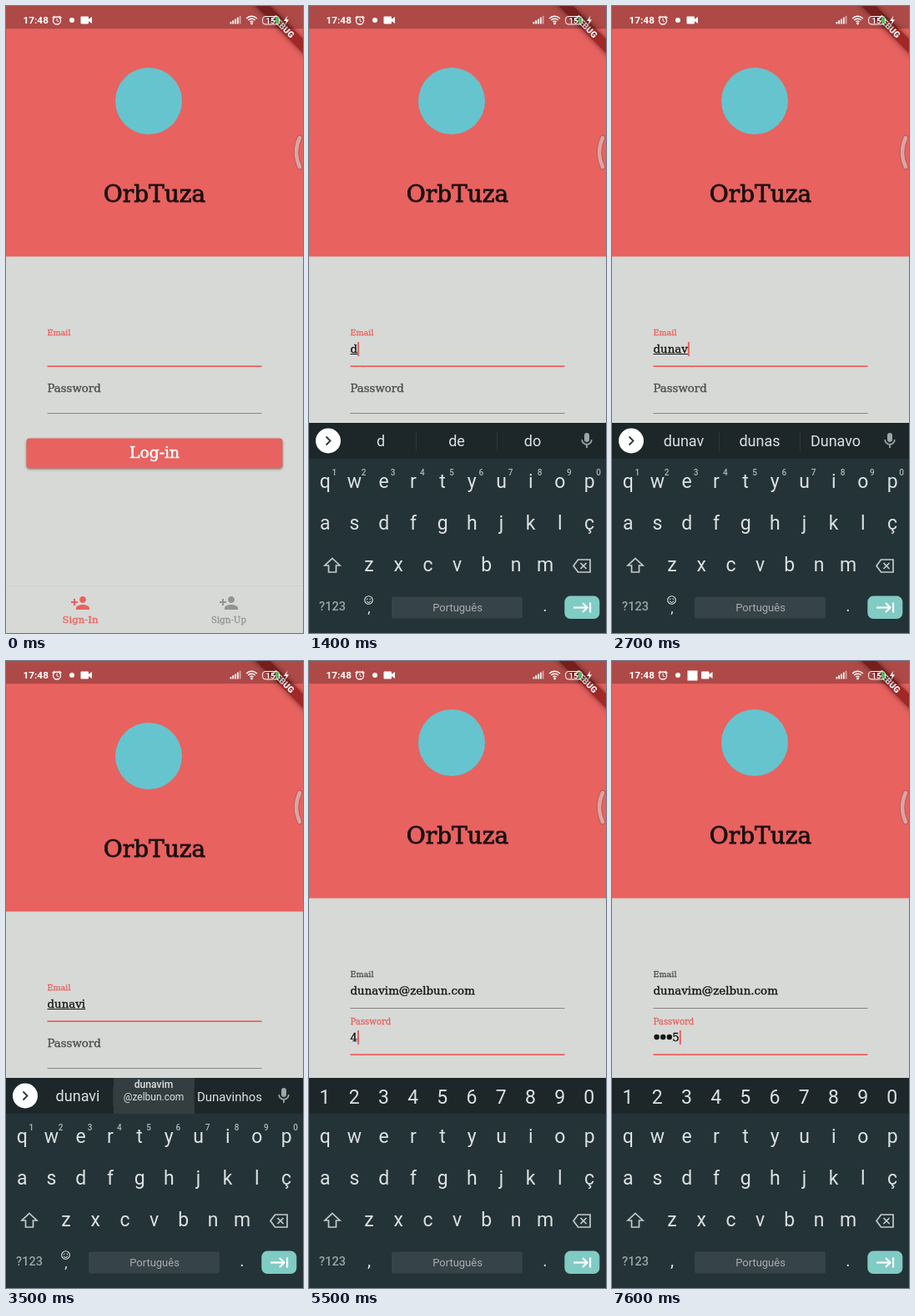
Animation of 356 by 752 pixels, one loop 8 s. Source, as an HTML page with a canvas:

```html
<!DOCTYPE html>
<html lang="en">
<head>
<meta charset="utf-8">
<title>Login form</title>
<style>
html, body { margin: 0; width: 100%; height: 100%; overflow: hidden; background: #d7d9d6; }
canvas { display: block; width: 356px; height: 752px; }
</style>
</head>
<body>
<canvas id="stage"></canvas>
<script>
const W = 356, H = 752, LOOP = 8000;
const RED = '#e8625f', BODY = '#d7d9d6', INK = '#171717', GREY = '#4d4f4e';
const KEY = '#dce1e2', DIM = '#9ca5a7', KEYS = '#243337', BAR = '#1d272a';
const SLAB = '"DejaVu Serif", serif', SANS = 'Roboto, sans-serif';
const EMAIL = 'dunavim@zelbun.com';
const PERSON = new Path2D('M15 12c2.2 0 4-1.8 4-4s-1.8-4-4-4-4 1.8-4 4 1.8 4 4 4zM6 10V7H4v3H1v2h3v3h2v-3h3v-2zM15 14c-2.7 0-8 1.3-8 4v2h16v-2c0-2.7-5.3-4-8-4z');

const canvas = document.getElementById('stage');
const c = canvas.getContext('2d');
const dpr = window.devicePixelRatio || 1;
canvas.width = W * dpr;
canvas.height = H * dpr;

const clamp = v => Math.max(0, Math.min(1, v));
const easeOut = (t, start, span, power = 2) => 1 - (1 - clamp((t - start) / span)) ** power;
const latest = (list, t) => list.filter(e => e[0] <= t).pop();

function rect(x, y, w, h, color, r = 0) {
  c.fillStyle = color;
  c.beginPath();
  c.roundRect(x, y, w, h, r);
  c.fill();
}

function disc(x, y, r, color) {
  c.fillStyle = color;
  c.beginPath();
  c.arc(x, y, r, 0, 7);
  c.fill();
}

function ring(x, y, r, color, w, a = 0, b = Math.PI * 2) {
  c.strokeStyle = color;
  c.lineWidth = w;
  c.beginPath();
  c.arc(x, y, r, a, b);
  c.stroke();
}

function poly(pts, color, w = 0, close = false) {
  c.beginPath();
  for (let i = 0; i < pts.length; i += 2) c.lineTo(pts[i], pts[i + 1]);
  if (close || !w) c.closePath();
  if (w) {
    c.strokeStyle = color;
    c.lineWidth = w;
    c.stroke();
  } else {
    c.fillStyle = color;
    c.fill();
  }
}

function text(s, x, y, size, color, font = SANS, align = 'center', weight = 400) {
  c.font = `${weight} ${size}px ${font}`;
  c.textAlign = align;
  c.fillStyle = color;
  c.fillText(s, x, y);
  return c.measureText(s).width;
}

// Slab lettering is a little heavier than the regular cut.
function slab(s, x, y, size, color, align = 'left') {
  const w = text(s, x, y, size, color, SLAB, align);
  c.strokeStyle = color;
  c.lineWidth = size * 0.03;
  c.lineJoin = 'round';
  c.strokeText(s, x, y);
  c.lineJoin = 'miter';
  return w;
}

// [time, text, still composing]
const typed = [[0, '', 0], [1400, 'd', 1], [1800, 'du', 1], [2100, 'dun', 1], [2400, 'duna', 1],
  [2600, 'dunav', 1], [2800, 'dunavi', 1], [3600, EMAIL, 0]];
const hints = [[1400, ['d', 'de', 'do']], [1900, ['du', 'da', 'duas']], [2200, ['dun', 'mãe', 'Dunel']],
  [2500, ['duna', 'dunas', 'Dunel']], [2700, ['dunav', 'dunas', 'Dunavo']],
  [3000, ['dunavi', '', 'Dunavinhos']], [3700, ['e', 'de', 'a']]];
// [time, hidden characters, visible last character]
const secret = [[0, 0, ''], [5400, 0, '4'], [5900, 1, '2'], [6500, 2, '1'], [7500, 3, '5']];
const restarts = [800, 1400, 1800, 2100, 2400, 2600, 2800, 3600, 4100, 5400, 5900, 6500, 7500];

function cursorOn(t) {
  const last = restarts.filter(r => r <= t).pop();
  return last !== undefined && (t - last) % 1000 < 500;
}

function cursor(x, base, t) {
  if (cursorOn(t)) rect(x, base - 13, 2, 17, RED);
}

function underline(y, active) {
  if (active) rect(49.5, y - 0.8, 257, 1.9, RED);
  else rect(49.5, y, 257, 1, '#858784');
}

function form(t) {
  const onSecret = t >= 4100;
  rect(0, 0, W, 300.6, RED);
  disc(171, 114, 40, '#66c4ce');
  slab('OrbTuza', 178, 235, 28, '#1c1011', 'center');

  slab('Email', 49.5, 395, 9.6, onSecret ? GREY : RED);
  const [, mail, composing] = latest(typed, t);
  const mw = slab(mail, 49.5, 416, 13.4, INK);
  if (composing) rect(49.5, 417, mw, 1, INK);
  if (!onSecret) cursor(49.5 + mw, 416, t);
  underline(432, !onSecret);

  const lift = easeOut(t, 4115, 200, 2.2);
  slab('Password', 49.5, 463 - 11 * lift, 13.3 - 3.2 * lift, onSecret ? RED : GREY);
  underline(488, onSecret);
  if (onSecret) {
    const [, dots, last] = latest(secret, t);
    for (let i = 0; i < dots; i++) disc(53.6 + i * 7.6, 467, 3.2, INK);
    const x = 49.5 + dots * 7.6;
    cursor(x + slab(last, x, 472, 13.4, INK), 472, t);
  }
}

function navItem(x, label, size, y, color) {
  c.save();
  c.translate(x - 12, 704);
  c.fillStyle = color;
  c.fill(PERSON);
  c.restore();
  slab(label, x, y, size, color, 'center');
}

function lowerPage() {
  c.save();
  c.shadowColor = 'rgba(0,0,0,.4)';
  c.shadowBlur = 3 * dpr;
  c.shadowOffsetY = 1.2 * dpr;
  rect(24.5, 518.6, 307, 36, RED, 4);
  c.restore();
  slab('Log-in', 178, 542, 18.7, '#fff', 'center');
  rect(0, 695, W, 1, '#cfd1ce');
  navItem(89, 'Sign-In', 11.7, 740, RED);
  navItem(267, 'Sign-Up', 10.2, 740, '#929491');
}

function mic(x, y) {
  rect(x - 3, y - 9, 6, 11, DIM, 3);
  ring(x, y - 1, 5.8, DIM, 1.7, 0, Math.PI);
  rect(x - 0.9, y + 4.5, 1.8, 4.5, DIM);
}

function chevron(dir) {
  disc(23, 521.5, 15, '#fff');
  poly([23 - 2.5 * dir, 516.5, 23 + 2.5 * dir, 521.5, 23 - 2.5 * dir, 526.5], '#2b3639', 1.8);
}

function tools() {
  chevron(-1);
  poly([65.5, 514.5, 80.5, 514.5, 80.5, 524, 75, 529.5, 65.5, 529.5], DIM, 1.8, true);
  disc(70.5, 519.5, 1.2, DIM);
  disc(75.5, 519.5, 1.2, DIM);
  ring(73, 521.5, 3.5, DIM, 1.4, 0.2, 2.9);
  text('GIF', 122, 526.5, 13.5, DIM, SANS, 'center', 900);
  for (let i = 0; i < 8; i++) {
    const a = i * Math.PI / 4, x = Math.cos(a), y = Math.sin(a);
    poly([172 + 5 * x, 522 + 5 * y, 172 + 8.8 * x, 522 + 8.8 * y], DIM, 3.6);
  }
  ring(172, 522, 5, DIM, 3.6);
  rect(213, 514, 16, 16, DIM);
  rect(252, 511, 1, 22, '#2c373a');
  for (let i = -1; i < 2; i++) disc(283 + i * 5.5, 522, 1.6, DIM);
  mic(333, 521);
}

function suggestions(t) {
  const words = latest(hints, t)[1];
  chevron(1);
  if (t >= 3500 && t < 3600) rect(129, 500, 97, 43, '#343e41');
  rect(128, 511, 1, 23, '#2c373a');
  rect(225, 511, 1, 23, '#2c373a');
  words.forEach((w, i) => text(w, 86 + 91 * i, 528, w.length > 8 ? 15 : 18, KEY));
  if (!words[1]) {
    text('dunavim', 177, 512, 12.2, KEY, SANS, 'center', 500);
    text('@zelbun.com', 177, 527, 12, KEY);
  }
  mic(333, 521);
}

function row(chars, x, y, hintsOn) {
  [...chars].forEach((k, i) => {
    text(k, x + i * 35.2, y, 23, KEY);
    if (hintsOn) text((i + 1) % 10, x + 11 + i * 35.2, 562.5, 10, '#b0b8ba', SANS, 'center', 500);
  });
}

function keyboard(t) {
  const locked = t >= 4400;
  c.save();
  c.translate(0, 252 * (1 - easeOut(t, 823, 277)));
  rect(0, 500, W, 252, KEYS);
  rect(0, 500, W, 43, BAR);
  if (locked) row('1234567890', 19, 530.5);
  else if (t < 1400) tools();
  else suggestions(t);

  row('qwertyuiop', 19.3, 578, !locked);
  row('asdfghjklç', 19.3, 628);
  row('zxcvbnm', 72, 678);

  poly([28, 662.5, 37, 671, 32.5, 671, 32.5, 679, 23.5, 679, 23.5, 671, 19, 671], '#c3cacc', 1.7, true);
  poly([322.5, 664, 337, 664, 337, 679, 322.5, 679, 317, 671.5], '#c3cacc', 1.7, true);
  poly([325.5, 668, 332.5, 675], '#c3cacc', 1.7);
  poly([332.5, 668, 325.5, 675], '#c3cacc', 1.7);

  text('?123', 28, 725, 14.5, DIM, SANS, 'center', 500);
  if (locked) {
    text(',', 72, 726, 21, KEY);
  } else {
    ring(71.5, 712.5, 4.8, KEY, 1.1);
    disc(69.7, 711.3, 0.8, KEY);
    disc(73.3, 711.3, 0.8, KEY);
    ring(71.5, 713, 2.4, KEY, 1, 0.2, 2.9);
    text(',', 72, 728, 17, KEY);
  }
  rect(99, 708.5, 157, 26, '#364348', 3);
  text('Português', 178, 726, 13, '#a7afb1');
  text('.', 283, 726, 20, KEY);

  rect(306.3, 707.6, 42, 27.4, '#80cbc4', 7);
  poly([317, 721.5, 333, 721.5], '#fff', 2.2);
  poly([328, 716, 333.5, 721.5, 328, 727], '#fff', 2.2);
  rect(336, 715.5, 2.2, 12, '#fff');
  c.restore();
}

function statusBar(t) {
  const white = '#fff';
  rect(0, 0, W, 27.3, 'rgba(0,0,0,.254)');
  text('17:48', 20.5, 21, 11.8, white, SANS, 'left', 700);
  ring(61, 17.5, 4.5, white, 1.3);
  poly([61, 14.7, 61, 17.7, 63, 19], white, 1);
  poly([55.5, 14.5, 58.5, 12], white, 1.3);
  poly([63.5, 12, 66.5, 14.5], white, 1.3);
  disc(79, 17, 3, white);

  const shift = t >= 7000 ? 17.5 : 0;
  if (shift) rect(90.5, 11.5, 12, 12, white);
  rect(89.5 + shift, 12.5, 9.5, 9, white, 1);
  poly([98 + shift, 16.5, 103 + shift, 13, 103 + shift, 21, 98 + shift, 17.5], white);

  for (let i = 0; i < 5; i++) {
    const h = 2.5 + i * 1.8;
    rect(268.5 + i * 2.8, 21.5 - h, 1.8, h, i < 4 ? white : 'rgba(255,255,255,.5)');
  }
  for (let i = 1; i < 4; i++) ring(294.5, 21, i * 2.9, white, 1.4, -Math.PI * 0.76, -Math.PI * 0.24);
  disc(294.5, 21, 1.4, white);

  c.strokeStyle = white;
  c.lineWidth = 1;
  c.beginPath();
  c.roundRect(307.5, 12.5, 20, 9.5, 3.5);
  c.stroke();
  rect(323, 13.5, 4, 7.5, '#55b85a', 1);
  text('15', 317, 21, 9.5, white, SANS, 'center', 500);
  poly([337.5, 11.5, 333, 18, 336, 18, 334.5, 23, 339, 16.3, 336, 16.3], white);
}

function banner() {
  c.save();
  c.translate(W, 0);
  c.rotate(Math.PI / 4);
  c.shadowColor = 'rgba(0,0,0,.5)';
  c.shadowBlur = 6 * dpr;
  rect(-60, 28, 120, 12, '#a02927');
  c.shadowColor = 'transparent';
  text('DEBUG', 0.5, 38, 10.4, '#fff', SANS, 'center', 900);
  c.restore();
}

function handle() {
  c.lineCap = 'round';
  for (const [w, color] of [[6.5, 'rgba(120,70,70,.35)'], [4.5, '#dba5a1']]) {
    c.strokeStyle = color;
    c.lineWidth = w;
    c.beginPath();
    c.moveTo(352, 158);
    c.quadraticCurveTo(344, 175.5, 352, 193);
    c.stroke();
  }
  c.lineCap = 'butt';
}

function draw(t) {
  c.setTransform(dpr, 0, 0, dpr, 0, 0);
  rect(0, 0, W, H, BODY);
  c.save();
  c.translate(0, -16 * easeOut(t, 4100, 200, 2.4));
  form(t);
  c.restore();
  if (t < 700) {
    lowerPage();
  } else {
    rect(0, 500, W, 252, '#f7faf7');
    keyboard(t);
  }
  banner();
  statusBar(t);
  handle();
}

function tick() {
  draw(performance.now() % LOOP);
  requestAnimationFrame(tick);
}
tick();
</script>
</body>
</html>
```
